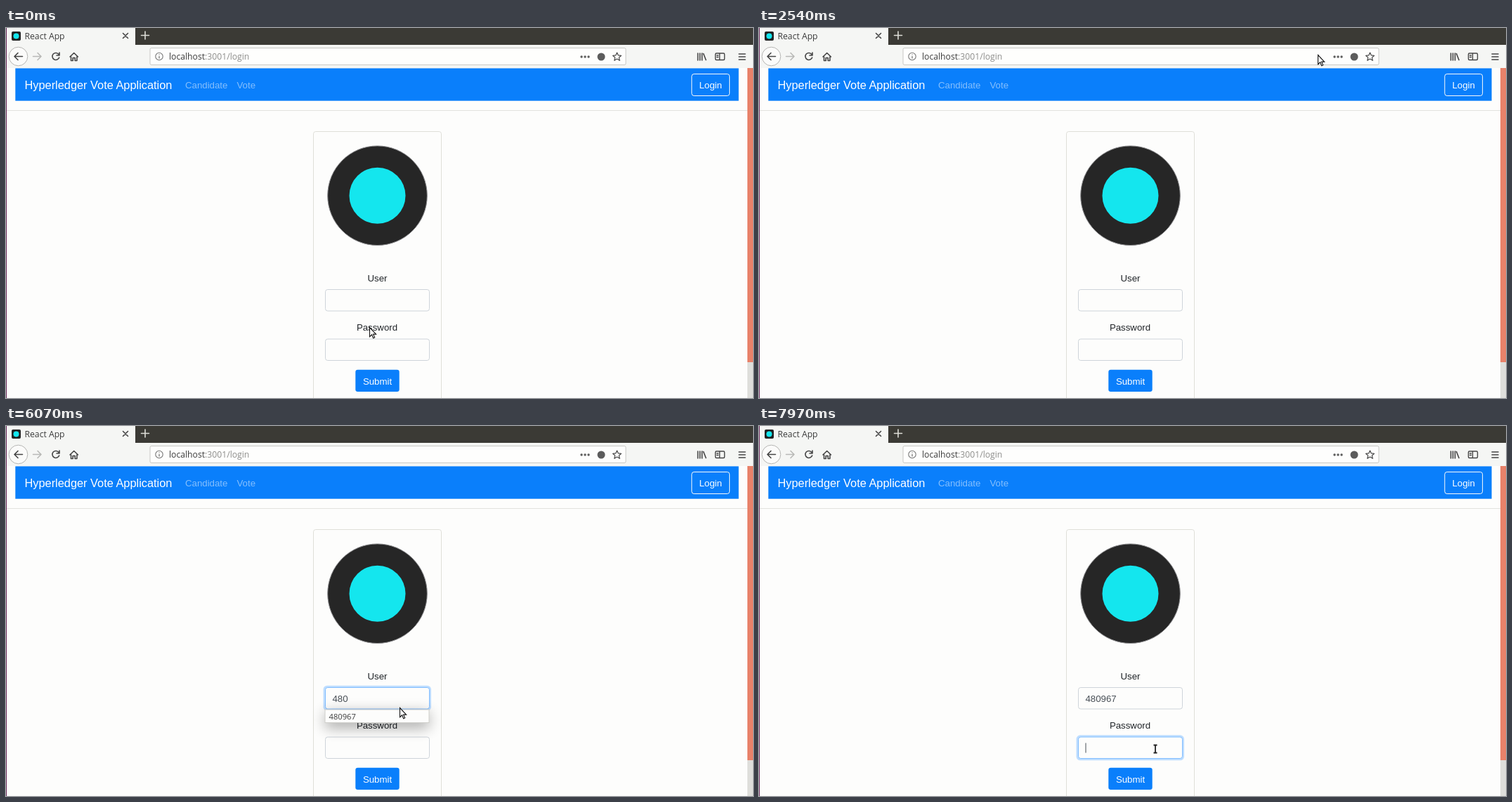
An HTML page that plays this animation: 1063x527 px, repeating every 8 s.

```html
<!DOCTYPE html>
<html lang="en">
<head>
<meta charset="utf-8">
<title>Login</title>
<style>
  html, body { margin: 0; width: 100%; height: 100%; overflow: hidden; background: #fdfdfc; }
  svg { display: block; width: 1063px; height: 527px; }
  text { font: 13.25px "Liberation Sans", Arial, sans-serif; fill: #212529; white-space: pre; }
  .ui { font: 12.2px "Open Sans", sans-serif; fill: #3b3b3b; }
  .mid { text-anchor: middle; }
  .icon { fill: none; stroke: #454545; stroke-width: 1.6; stroke-linecap: round; stroke-linejoin: round; }
  .field { fill: #fdfdfc; stroke: #ced4da; }
  .field.on { stroke: #80bdff; }
  .glow { fill: #bfdeff; visibility: hidden; }
  .value { fill: #495057; }
</style>
</head>
<body>
<svg viewBox="0 0 1063 527">
  <defs>
    <filter id="blur" x="-30%" y="-200%" width="160%" height="500%">
      <feGaussianBlur stdDeviation="10"/>
    </filter>
  </defs>
  <rect width="1063" height="527" fill="#fdfdfc"/>

  <!-- browser chrome -->
  <rect width="1063" height="24" fill="#3b3a35"/>
  <rect width="184" height="24" fill="#f5f6f4"/>
  <rect y="24" width="1063" height="33" fill="#f5f6f4"/>
  <rect x="8" y="5" width="13" height="13" rx="2" fill="#222"/>
  <circle cx="14.5" cy="11.5" r="4" fill="#14e6ee"/>
  <text class="ui" x="26.500" y="15.5">React App</text>
  <path class="icon" d="M166.500 7.500l7 7m0-7l-7 7"/>
  <path class="icon" style="stroke:#deded8" d="M192.500 10.500h11m-5.500-5.500v11"/>

  <circle cx="17.500" cy="40.500" r="13.300" fill="#fbfbfa" stroke="#b5b5b3"/>
  <path class="icon" d="M12 40.500h11.500M17 35.500l-5 5 5 5"/>
  <path class="icon" style="stroke:#b9b9b7" d="M38.500 40.500H50M45 35.500l5 5-5 5"/>
  <path class="icon" d="M75 37.500a5 5 0 1 0 .7 4.500M76 35v4h-4"/>
  <path class="icon" d="M91 41l5.700-5.500 5.700 5.500M92.500 41v5.500h2.700v-4h3v4h2.700v-5.500"/>

  <rect x="205" y="28.500" width="677" height="24" rx="2" fill="#fefefd" stroke="#c8c8c5"/>
  <circle class="icon" cx="218" cy="40.500" r="5.200" style="stroke:#777;stroke-width:1.1"/>
  <path d="M218 40v3.500M218 37.400v1.200" stroke="#777" stroke-width="1.300"/>
  <text class="ui" x="232" y="45">localhost<tspan fill="#8d8d8b">:3001/login</tspan></text>
  <g fill="#5c5c5c">
    <circle cx="819" cy="41" r="1.700"/><circle cx="824" cy="41" r="1.700"/><circle cx="829" cy="41" r="1.700"/>
    <circle cx="847" cy="41" r="5.500"/>
  </g>
  <path class="icon" style="stroke-width:1.2" d="M869.500 35l1.800 3.900 4.200.4-3.200 2.800 1 4.200-3.800-2.200-3.800 2.200 1-4.200-3.200-2.800 4.200-.4z"/>
  <path class="icon" d="M984.500 36v10M987.500 36v10M990.500 36v10M992.500 36.500l3.500 9"/>
  <path class="icon" style="stroke-width:1.400" d="M1011 36h10a1.500 1.500 0 0 1 1.500 1.500v6.500a1.500 1.500 0 0 1-1.500 1.500h-10a1.500 1.500 0 0 1-1.500-1.500v-6.500a1.500 1.500 0 0 1 1.500-1.500zM1015.500 36v9.500M1011.500 39h2M1011.500 41.500h2"/>
  <path class="icon" d="M1043 37h9M1043 41h9M1043 45h9"/>

  <!-- page -->
  <rect x="13.300" y="57.400" width="1029.300" height="46.300" fill="#0a7ffb"/>
  <text x="26.500" y="86.500" style="font-size:16.350px;fill:#fff">Hyperledger Vote Application</text>
  <text x="255" y="85.500" style="fill:#85bffd">Candidate</text>
  <text x="328.500" y="85.500" style="fill:#85bffd">Vote</text>
  <rect x="975.800" y="65.500" width="53.800" height="31" rx="3.300" fill="none" stroke="#f8f9fa"/>
  <text class="mid" x="1002.700" y="85.500" style="fill:#fff">Login</text>
  <path d="M1 117.500H1055" stroke="#e2e2de"/>
  <rect x="1055" y="57" width="8" height="470" fill="#dededb"/>
  <rect x="1055" y="57" width="8" height="419" fill="#e8826a"/>
  <path d="M.5 0V527" stroke="#6a2a5c"/>

  <rect x="437.500" y="147.500" width="182" height="400" rx="3.300" fill="none" stroke="#dfdfd9"/>
  <circle cx="528.500" cy="238.700" r="70.800" fill="#262626" stroke="#8e8e90"/>
  <circle cx="528.500" cy="238.700" r="40" fill="#14e6ee"/>

  <text class="mid" x="528.500" y="360.700">User</text>
  <text class="mid" x="528" y="431.200">Password</text>
  <rect id="userGlow" class="glow" x="451.500" y="369.700" width="153.500" height="36" rx="5.500"/>
  <rect id="user" class="field" x="454.500" y="372.500" width="148" height="30.500" rx="3.300"/>
  <text id="value" class="value" x="464.500" y="392.500"></text>
  <rect id="passGlow" class="glow" x="451.500" y="440.300" width="153.500" height="36" rx="5.500"/>
  <rect id="pass" class="field" x="454.500" y="443" width="148" height="30.500" rx="3.300"/>
  <rect id="caret" width="1" height="14" fill="#495057"/>
  <rect x="497.300" y="486.700" width="62.400" height="31.300" rx="3.300" fill="#0a7ffb"/>
  <text class="mid" x="528.500" y="507.500" style="fill:#fff">Submit</text>

  <g id="popup">
    <path filter="url(#blur)" fill="#000" opacity=".32" d="M454 408h148v22H454z"/>
    <rect x="454" y="404" width="148" height="18.500" fill="#fdfdfc" stroke="#cfcfcb"/>
    <text id="hint" class="ui" x="459.500" y="417.800" style="font-size:11.200px"></text>
  </g>

  <path id="arrow" d="M.5.500v13.200l3.100-2.900 2.100 4.900 2-.9-2.100-4.700h4z" fill="#fff" stroke="#111" stroke-width="1.100"/>
  <g id="beam" fill="none">
    <path d="M-2.500-5.500h5M0-5.500v11M-2.500 5.500h5" stroke="#fff" stroke-width="4"/>
    <path d="M-2.500-5.500h5M0-5.500v11M-2.500 5.500h5" stroke="#222" stroke-width="1.800"/>
  </g>
</svg>
<script>
  const LOOP = 8000, ACCOUNT = '480967';
  const FOCUS_USER = 4000, OPEN = 4500, PICK = 6750, FOCUS_PASS = 7650;
  const KEYS = [OPEN, 5250, 5450];   // one character per key press
  const PATH = [                     // time, x, y of the pointer
    [0, 517, 426], [150, 519, 421], [1150, 700, -30], [2420, 820, -30], [2540, 795, 38],
    [3050, 690, 300], [3340, 636, 442], [3500, 585, 409], [3850, 560, 383], [5830, 560, 383],
    [6070, 560, 401], [6350, 561, 412], [6800, 561, 412], [7130, 564, 457], [7300, 564, 457],
    [7550, 564, 460], [LOOP, 564, 460]
  ];
  const $ = id => document.getElementById(id);
  const show = (id, on) => { $(id).style.visibility = on ? 'visible' : 'hidden'; };

  function pointerAt(t) {
    const i = Math.max(1, PATH.findIndex(p => p[0] > t));
    const [t0, x0, y0] = PATH[i - 1], [t1, x1, y1] = PATH[i];
    const u = (t - t0) / (t1 - t0), e = u * u * (3 - 2 * u);
    return [x0 + (x1 - x0) * e, y0 + (y1 - y0) * e];
  }

  const inField = (x, y) => x > 454 && x < 603 && ((y > 372 && y < 403) || (y > 443 && y < 474));

  function focus(id, on) {
    $(id).classList.toggle('on', on);
    show(id + 'Glow', on);
  }

  function render(t) {
    const typed = t >= PICK ? ACCOUNT.length : KEYS.filter(k => t >= k).length;
    const onPass = t >= FOCUS_PASS, onUser = t >= FOCUS_USER && !onPass;
    const open = t >= OPEN && t < PICK;
    focus('user', onUser);
    focus('pass', onPass);
    show('popup', open);
    $('value').textContent = ACCOUNT.slice(0, typed);

    // The caret restarts its blink on every input event.
    const last = [FOCUS_USER, ...KEYS, PICK, FOCUS_PASS].filter(k => t >= k).pop();
    show('caret', last !== undefined && (t - last) % 1200 < 600);
    $('caret').setAttribute('x', onPass ? 464.5 : 464.5 + typed * 7.37);
    $('caret').setAttribute('y', onPass ? 451.5 : 381);

    const [x, y] = pointerAt(t), beam = inField(x, y) && !open;
    show('arrow', !beam);
    show('beam', beam);
    $(beam ? 'beam' : 'arrow').setAttribute('transform', `translate(${x.toFixed(1)} ${y.toFixed(1)})`);
  }

  $('hint').textContent = ACCOUNT;
  const start = performance.now();
  function tick() {
    render((performance.now() - start) % LOOP);
    requestAnimationFrame(tick);
  }
  tick();
</script>
</body>
</html>
```
